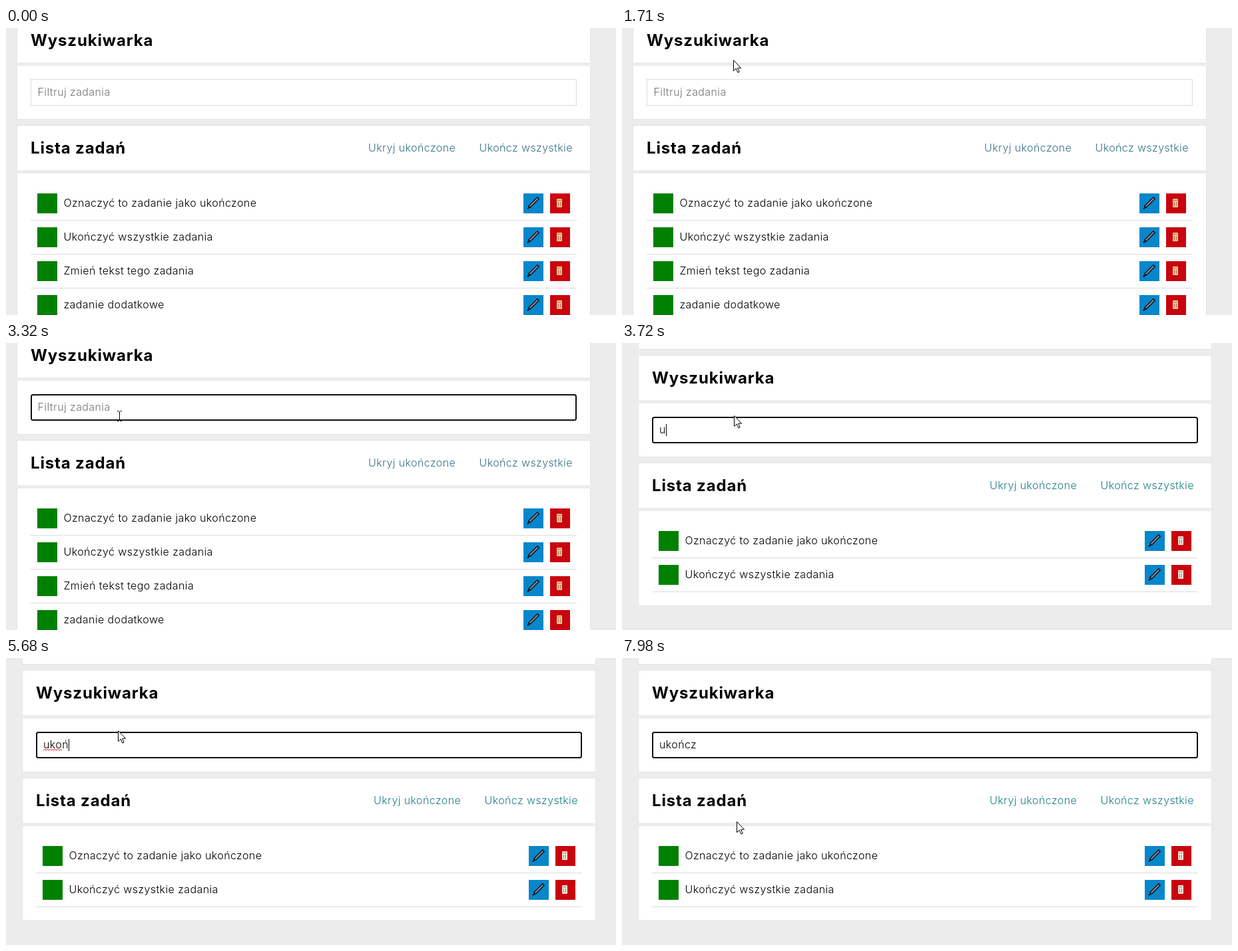
These frames come from a looping animation (916x432 px, 8 s). An HTML page:

```html
<!DOCTYPE html>
<html lang="pl">
<head>
<meta charset="utf-8">
<title>Lista zadań</title>
<style>
  html, body { margin: 0; width: 100%; height: 100%; overflow: hidden; background: #ececec; }
  svg { display: block; width: 100%; height: 100%; }
  text { font: 350 16px Inter, "Open Sans", sans-serif; letter-spacing: .025em; white-space: pre; }
  .title { font-weight: 700; font-size: 24px; letter-spacing: .035em; }
  .hint { fill: #757575; }
  .link { fill: #37728a; }
  .filtered .link { fill: #1f7f86; }
  .bin { fill: #ecc98c; }
  .filtered .bin { fill: #f1e6dc; }
</style>
</head>
<body>
<svg id="stage" viewBox="0 0 916 432" xmlns="http://www.w3.org/2000/svg"></svg>
<script>
const LOOP = 8000, STEP = 70, BLINK = 530;
const FOCUS = 2790, FILTER = 3720;
const WORD = 'ukończ', KEYS = [FILTER, 4070, 4210, 5550, 6080, 6280];
const stage = document.getElementById('stage');

function add(parent, tag, attrs = {}, content = '') {
  const node = document.createElementNS('http://www.w3.org/2000/svg', tag);
  for (const key in attrs) node.setAttribute(key, attrs[key]);
  node.textContent = content;
  return parent.appendChild(node);
}
const rect = (parent, x, y, width, height, fill, more) =>
  add(parent, 'rect', { x, y, width, height, fill, ...more });
const line = (parent, d, stroke, width = 1) =>
  add(parent, 'path', { d, stroke, 'stroke-width': width, fill: 'none' });
const label = (parent, x, y, str, cls = '') => add(parent, 'text', { x, y, class: cls }, str);
const card = (parent, y, height) =>
  rect(parent, 16.5, y - .5, 861, height + 1, '#fff', { stroke: '#e4e4e4' });
const show = (node, on) => node.setAttribute('display', on ? 'inline' : 'none');

function row(parent, str, index) {
  const g = add(parent, 'g', { transform: `translate(0 ${index * 51})` });
  rect(g, 47, 249, 30, 30, '#008000');
  label(g, 86.5, 269, str);
  rect(g, 777, 249, 30, 30, '#0686cb');
  rect(g, 817, 249, 30, 30, '#c9040f');
  rect(g, 37, 289, 820, 1, '#dcdcdc');
  // pen
  line(g, 'M783 272.5L787 268', '#111', 2);
  line(g, 'M785.5 269.5L799.5 255.5', '#111', 4.6);
  line(g, 'M786.5 268.5L798.5 256.5', '#8f8ba6', 1.8);
  // bin
  rect(g, 827, 257, 8, 13, '', { class: 'bin', rx: 1 });
  line(g, 'M828 259.5h6M829.5 262v6M832.5 262v6', '#9a5a42', .8);
  return g;
}

// page
const page = add(stage, 'g');
card(page, -110, 85);
card(page, -15, 152);
rect(page, 16, 52, 862, 5, '#ececec');
const list = card(page, 147, 400);
rect(page, 16, 214, 862, 5, '#ececec');
label(page, 37, 27, 'Wyszukiwarka', 'title');
label(page, 37, 189, 'Lista zadań', 'title');
label(page, 544, 186, 'Ukryj ukończone', 'link');
label(page, 710.5, 186, 'Ukończ wszystkie', 'link');
const rows = ['Oznaczyć to zadanie jako ukończone', 'Ukończyć wszystkie zadania',
  'Zmień tekst tego zadania', 'zadanie dodatkowe'].map((str, i) => row(page, str, i));

// search field
const box = rect(page, 37.5, 77.5, 819, 39, '#fff', { stroke: '#dcdcdc' });
const outline = rect(page, 38, 78, 818, 38, '#fff', { rx: 2.5, stroke: '#101010', 'stroke-width': 2 });
const hint = label(page, 47.5, 102, 'Filtruj zadania', 'hint');
const query = label(page, 48, 102, '');
const squiggle = line(page, 'M48 105' + 'l2 -1.6l2 1.6'.repeat(7), '#e02020');
const caret = rect(page, 48, 88, 1, 18, '#000');

// pointer
const cursor = add(stage, 'g');
const arrow = add(cursor, 'path', { d: 'M.5 .5v16l3.7-3.5 2.7 6 2.3-1-2.6-5.8h5z', fill: '#fff', stroke: '#000' });
const beam = add(cursor, 'g');
const glow = add(beam, 'circle', { cx: -1.5, cy: -1, r: 12, fill: '#ff0', opacity: .55 });
line(beam, 'M-3 -7.5h2.5M1.5 -7.5h2.5M.5 -7v14M-3 7.5h2.5M1.5 7.5h2.5', '#000');

// each move: start, steps, then a quadratic curve
const moves = [
  [330, 6, [557, 351], [-100, 240], [299, 158]],
  [880, 4, [285, 130], [200, 50], [155, 7]],
  [1360, 6, [155, 7], [-60, 40], [167, 48]],
  [1780, 6, [185, 44], [225, -40], [179, 59]],
  [2210, 11, [179, 62], [168, 110], [170, 110]],
  [FILTER, 1, [168, 109], [168, 109], [168, 109]],
  [7560, 7, [169, 118], [206, 170], [172, 246]]
];

function position([start, steps, a, b, c], t) {
  const i = Math.floor((t - start + 20) / STEP);
  const u = steps > 1 ? Math.min(1, i / (steps - 1)) : 1;
  return a.map((v, k) => Math.round(v * (1 - u) ** 2 + 2 * b[k] * u * (1 - u) + c[k] * u * u));
}

function drawField(t) {
  const focused = t >= FOCUS;
  const count = KEYS.filter(key => key <= t).length;
  const sinceKey = t - (KEYS[count - 1] || FOCUS);
  show(box, !focused);
  show(outline, focused);
  show(hint, !count);
  query.textContent = WORD.slice(0, count);
  show(squiggle, count === 4);
  caret.setAttribute('x', 48 + (count && Math.round(query.getComputedTextLength())));
  show(caret, focused && Math.floor(sinceKey / BLINK) % 2 === 0);
}

function drawCursor(t) {
  const move = moves.filter(([start]) => start <= t).pop();
  show(cursor, move);
  if (!move) return;
  const [x, y] = position(move, t);
  const overField = t < FILTER && y > 77 && move[0] > 2000;
  cursor.setAttribute('transform', `translate(${x} ${y})`);
  show(arrow, !overField);
  show(beam, overField);
  show(glow, t >= 2690 && t < 2960);
}

function draw(t) {
  const filtered = t >= FILTER;
  page.setAttribute('transform', filtered ? 'translate(8 34)' : '');
  page.setAttribute('class', filtered ? 'filtered' : '');
  list.setAttribute('height', filtered ? 215 : 401);
  rows.forEach((r, i) => show(r, !filtered || i < 2));
  drawField(t);
  drawCursor(t);
}

const begin = performance.now();
function tick() {
  draw((performance.now() - begin) % LOOP);
  requestAnimationFrame(tick);
}
tick();
</script>
</body>
</html>
```
